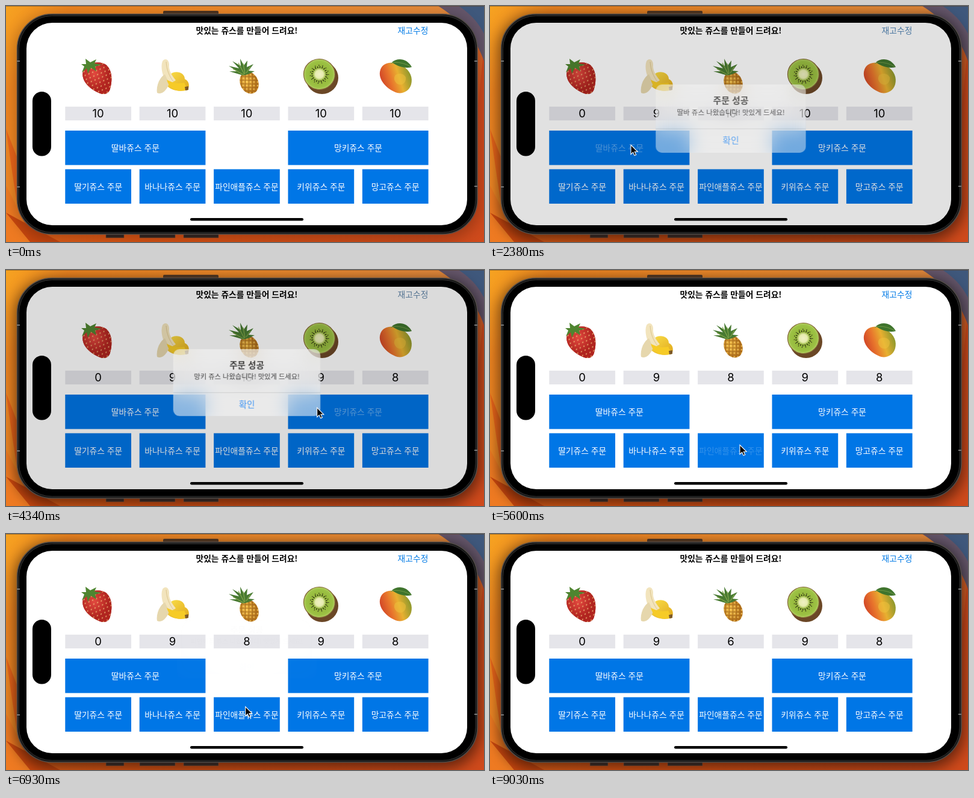
An HTML page for the animation above (9.59 s loop, 794x394 px).

```html
<!DOCTYPE html>
<html lang="ko">
<head>
<meta charset="utf-8">
<style>
  html, body { margin: 0; width: 100%; height: 100%; overflow: hidden; }
  body { position: relative; font: 13.8px "Noto Sans CJK KR", "Noto Sans CJK", sans-serif; }
  svg { position: absolute; left: 0; top: 0; }
  text { text-anchor: middle; }
  .bold { font-weight: 600; }
  .count { font: 18.5px Inter, sans-serif; }
  #alert {
    position: absolute; left: 284px; top: 135px; width: 232px; height: 106px;
    border-radius: 10px; overflow: hidden;
    background: rgba(246, 246, 246, .8); backdrop-filter: blur(14px);
  }
  #okPress { position: absolute; top: 69px; width: 100%; height: 37px; background: rgba(0, 0, 0, .09); }
</style>
</head>
<body>
<svg width="794" height="394">
  <defs>
    <linearGradient id="wall" x2="1" y2=".35">
      <stop stop-color="#f6a321"/><stop offset=".12" stop-color="#ee8420"/><stop offset=".5" stop-color="#ee8a2c"/>
      <stop offset=".82" stop-color="#e58a3c"/><stop offset="1" stop-color="#d2521e"/>
    </linearGradient>
    <linearGradient id="low" x2="1">
      <stop stop-color="#e8651a"/><stop offset=".3" stop-color="#dc5414"/><stop offset="1" stop-color="#cf4a1c"/>
    </linearGradient>
    <radialGradient id="berry" cx=".4" cy=".35"><stop stop-color="#e2493f"/><stop offset="1" stop-color="#b0241f"/></radialGradient>
    <linearGradient id="peel" y2="1"><stop stop-color="#fbe04a"/><stop offset="1" stop-color="#e0a81c"/></linearGradient>
    <radialGradient id="pine" cx=".4" cy=".4"><stop stop-color="#f3bd45"/><stop offset="1" stop-color="#bd7a1e"/></radialGradient>
    <radialGradient id="kiwi">
      <stop stop-color="#f0f0c4"/><stop offset=".26" stop-color="#e6ecae"/><stop offset=".42" stop-color="#94b53a"/>
      <stop offset=".85" stop-color="#9cc244"/><stop offset="1" stop-color="#b6cf66"/>
    </radialGradient>
    <linearGradient id="mango" y1=".7" x2="1" y2=".4">
      <stop stop-color="#cc3b26"/><stop offset=".35" stop-color="#e8752c"/><stop offset=".62" stop-color="#e8b030"/><stop offset="1" stop-color="#86962c"/>
    </linearGradient>
    <pattern id="seeds" width="9" height="10" patternUnits="userSpaceOnUse" patternTransform="rotate(25)">
      <ellipse cx="2" cy="2.5" rx=".8" ry="1.2" fill="#f3c57c"/><ellipse cx="6.5" cy="7.5" rx=".8" ry="1.2" fill="#f3c57c"/>
    </pattern>
    <pattern id="mesh" width="6" height="6" patternUnits="userSpaceOnUse" patternTransform="rotate(25)">
      <path d="M0 0H6M0 0V6" stroke="#97601c" stroke-width="1.5"/><circle cx="3" cy="3" r=".9" fill="#ffdc78"/>
    </pattern>
    <filter id="soft" x="-10%" y="-10%" width="120%" height="125%"><feGaussianBlur stdDeviation="11"/></filter>
    <clipPath id="screen"><rect x="34" y="28" width="732" height="338" rx="43"/></clipPath>
  </defs>

  <rect width="794" height="394" fill="url(#wall)"/>
  <path d="M0 205C8 260 14 310 30 394H794V70C785 150 775 300 740 360H60Z" fill="url(#low)"/>
  <path d="M0 300C16 330 26 350 44 394H0Z" fill="#ee7a22"/>
  <path d="M0 345L90 394H40Z" fill="#c9470f"/>
  <path d="M718 0H794V92C780 50 750 20 718 0Z" fill="#65566a"/>
  <path d="M752 0H794V46C784 26 770 12 752 0Z" fill="#3f587c"/>
  <rect id="shadow" x="14" y="14" width="774" height="378" rx="60" filter="url(#soft)"/>
  <path d="M0 .5H794" stroke="#5a3c1c" opacity=".45"/>

  <path d="M261 13V10Q261 8 263 8H351Q353 8 353 10V13Z" fill="#49311f"/>
  <path d="M166 380H196V387H166ZM222 380H281V387H222ZM295 380H353V387H295Z" fill="#2d211d" stroke="#70402a" stroke-width=".7"/>
  <rect x="18.5" y="13.5" width="764.5" height="367.5" rx="58" fill="#161616" stroke="#524c48" stroke-width="1.5"/>
  <rect x="21.5" y="16.5" width="758.5" height="361.5" rx="55" stroke="#343434"/>
  <path d="M18 92H23M18 302H23M778 92H783M778 301H783" stroke="#777" stroke-width="2"/>

  <g clip-path="url(#screen)">
    <rect x="34" y="28" width="732" height="338" fill="#fff"/>
    <text class="bold" x="400" y="45.5">맛있는 쥬스를 만들어 드려요!</text>
    <text id="edit" x="676" y="45.5">재고수정</text>

    <g transform="translate(123 87)">
      <path id="berryBody" d="M5 22C9 8 32 3 43 11C54 20 54 38 50 51C48 60 39 62 31 58C15 51 1 37 5 22Z" fill="url(#berry)"/>
      <use href="#berryBody" style="fill:url(#seeds)"/>
      <path d="M5 22C9 8 32 3 43 11C54 20 54 38 50 51C48 60 39 62 31 58C15 51 1 37 5 22Z" fill="url(#seeds)"/>
      <path d="M2 10L10 10L9 1L17 7L27 2L24 9L36 11L25 14L27 22L18 16L13 26L11 17L3 24L7 14Z" fill="#4f8530"/>
    </g>
    <g transform="translate(247 87)">
      <path d="M24 29C32 19 50 23 50 35C58 38 58 48 55 53C44 56 26 56 18 43Z" fill="url(#peel)"/>
      <path d="M13 5C17-1 24 2 24 11C23 20 28 28 35 37L22 45C13 32 9 15 13 5Z" fill="#f2e4bd"/>
      <path d="M19 6C20 20 24 30 31 39" stroke="#dcc58e" fill="none"/>
      <path d="M17 27C8 32 2 47 4 58C13 62 21 52 24 42Z" fill="#e6d7ad"/>
      <path d="M20 36C28 40 36 44 49 41L55 53C40 57 25 55 20 36Z" fill="#f6cb27"/>
      <path d="M50 48L56 47V53L51 54Z" fill="#7c5928"/>
    </g>
    <g transform="translate(369 87)">
      <g transform="rotate(-24 35 41)">
        <ellipse cx="35" cy="41" rx="15" ry="19" fill="url(#pine)"/>
        <ellipse cx="35" cy="41" rx="15" ry="19" fill="url(#mesh)"/>
      </g>
      <path d="M25 29L2 22L15 22L1 13L18 17L7 5L21 13L20 1L26 12L32 4L31 15L42 10L34 21L44 22L33 27Z" fill="#487a32"/>
      <path d="M26 28L8 18M27 27L17 8M28 26L25 9M30 25L37 14" stroke="#86a84c" stroke-width="1.2"/>
    </g>
    <g transform="translate(493 87)">
      <circle cx="32" cy="33" r="27" fill="#6b4726"/>
      <ellipse cx="27.5" cy="27" rx="26" ry="25.5" fill="url(#kiwi)" stroke="#806333" stroke-width="1.2"/>
      <circle cx="27.5" cy="27" r="12" fill="none" stroke="#2c2c16" stroke-width="3" stroke-dasharray="1.3 2.47"/>
      <circle cx="27.5" cy="27" r="15" fill="none" stroke="#2c2c16" stroke-width="2" stroke-dasharray="1 5.28"/>
    </g>
    <g transform="translate(618 87)">
      <path d="M4 19C9 5 29 5 41 13C54 21 58 33 55 44C52 55 41 60 32 58C16 53-2 36 4 19Z" fill="url(#mango)"/>
      <path d="M29 28C36 24 43 26 46 32C47 42 39 47 32 43C27 39 25 33 29 28Z" fill="#efc13c" opacity=".55"/>
      <path d="M23 7C32-1 48 0 56 15C45 18 33 14 23 7Z" fill="#3f742d"/>
      <path d="M21 9L27 7Q42 7 54 14" stroke="#739b48" fill="none"/>
    </g>
    <g id="controls"></g>
    <rect id="dim" x="34" y="28" width="732" height="338"/>
  </g>
  <rect x="44" y="143" width="31" height="107.5" rx="15.5"/>
  <rect x="306" y="354" width="188" height="4.5" rx="2.2"/>
</svg>

<div id="alert">
  <div id="okPress"></div>
  <svg width="232" height="106">
    <text class="bold" x="116" y="30">주문 성공</text>
    <text id="message" x="116" y="47.5" font-size="10.7"></text>
    <path d="M0 68.8H232" stroke="#000" stroke-opacity=".2" stroke-width=".7"/>
    <text x="116" y="92.5" fill="#007aff">확인</text>
  </svg>
</div>

<svg width="794" height="394">
  <path id="cursor" d="M0 0V15.6L3.6 12.2L6 17.6L8.7 16.5L6.3 11.3H11.2Z" stroke="#fff" stroke-width="1.1"/>
</svg>

<script>
const $ = id => document.getElementById(id);
const LOOP = 9590, STEP = 70;
const colX = i => 98.3 + i * 123.4, COL_W = 109.7;

// label, column, column span, top
const buttons = [
  ['딸바쥬스 주문', 0, 2, 208], ['망키쥬스 주문', 3, 2, 208],
  ['딸기쥬스 주문', 0, 1, 272.5], ['바나나쥬스 주문', 1, 1, 272.5], ['파인애플쥬스 주문', 2, 1, 272.5],
  ['키위쥬스 주문', 3, 1, 272.5], ['망고쥬스 주문', 4, 1, 272.5]
];
const orders = [
  { at: 2240, press: 3080, close: 3220, button: 0, name: '딸바', use: [10, 1, 0, 0, 0] },
  { at: 4166, press: 4760, close: 4900, button: 1, name: '망키', use: [0, 0, 0, 1, 2] },
  { at: 5600, press: 6300, close: 6440, button: 4, name: '파인애플', use: [0, 0, 2, 0, 0] },
  { at: 7140, press: 7840, close: 7980, button: 4, name: '파인애플', use: [0, 0, 2, 0, 0] }
];
// time, x, y of the pointer tip
const path = [
  [560, 4, 253], [1260, 206, 230], [1400, 206, 230], [1540, 237, 231], [1610, 237, 231], [1750, 226, 232],
  [1820, 234, 232], [2400, 234, 232], [3010, 396, 224], [3290, 396, 224], [3990, 540, 231], [4220, 540, 231],
  [4690, 396, 224], [4970, 396, 224], [5530, 415, 292], [5740, 415, 292], [6230, 393, 225], [6510, 393, 225],
  [7000, 398, 292], [7280, 398, 292], [7770, 391, 225], [8050, 391, 225], [8680, 388, 291], [8750, 388, 291], [9030, 388, 392]
];

let markup = '';
for (let i = 0; i < 5; i++) {
  markup += `<rect x="${colX(i)}" y="168" width="${COL_W}" height="23" fill="#e5e5ea"/>
    <text id="count${i}" class="count" x="${colX(i) + COL_W / 2}" y="186.4"></text>`;
}
buttons.forEach(([label, col, span, y], i) => {
  const w = COL_W + (span - 1) * 123.4;
  markup += `<rect x="${colX(col)}" y="${y}" width="${w}" height="57.5" fill="#0076e6"/>
    <text id="label${i}" x="${colX(col) + w / 2}" y="${y + 34}" fill="#fff">${label}</text>`;
});
$('controls').innerHTML = markup;

const clamp = v => Math.max(0, Math.min(1, v));
const decay = ms => ms <= 0 ? 1 : (1 + .014 * ms) * Math.exp(-.014 * ms);

function pointer(t) {
  const i = path.findIndex(p => p[0] > t);
  if (i < 1) return null;
  const [t0, x0, y0] = path[i - 1], [t1, x1, y1] = path[i];
  const u = (t - t0) / (t1 - t0), e = u * u * (3 - 2 * u);
  return [x0 + (x1 - x0) * e, y0 + (y1 - y0) * e];
}

function labelAlpha(t, button) {
  return Math.min(1, ...orders.filter(o => o.button === button && t >= o.at - 100)
    .map(o => .2 + .8 * clamp((t - o.at) / 470) ** 1.4));
}

function draw(t) {
  const order = orders.filter(o => t >= o.at).pop();
  let shown = 0;
  if (order) {
    const opened = 1 - decay(t - order.at);
    shown = opened * decay(t - order.close);
    if (shown < .004) shown = 0;
    $('message').textContent = `${order.name} 쥬스 나왔습니다! 맛있게 드세요!`;
    $('alert').style.transform = `scale(${1 + .18 * (1 - opened)})`;
    $('okPress').style.opacity = +(t >= order.press && t < order.close + 140);
  }
  $('alert').style.opacity = shown;
  $('alert').style.visibility = shown ? 'visible' : 'hidden';
  $('dim').setAttribute('opacity', .2 * shown);
  const mix = (a, b) => a + (b - a) * shown;
  $('edit').setAttribute('fill', `rgb(${mix(0, 138)},${mix(122, 138)},${mix(230, 142)})`);
  $('shadow').setAttribute('opacity', t < 2240 ? .22 : .5);

  for (let i = 0; i < 5; i++) {
    $('count' + i).textContent = orders.reduce((n, o) => n - (t >= o.at ? o.use[i] : 0), 10);
  }
  buttons.forEach((b, i) => $('label' + i).setAttribute('fill-opacity', labelAlpha(t, i)));

  const tip = pointer(t);
  $('cursor').setAttribute('visibility', tip ? 'visible' : 'hidden');
  if (tip) $('cursor').setAttribute('transform', `translate(${tip})`);
}

function tick() {
  draw(Math.floor(performance.now() % LOOP / STEP) * STEP);
  requestAnimationFrame(tick);
}
tick();
</script>
</body>
</html>
```
